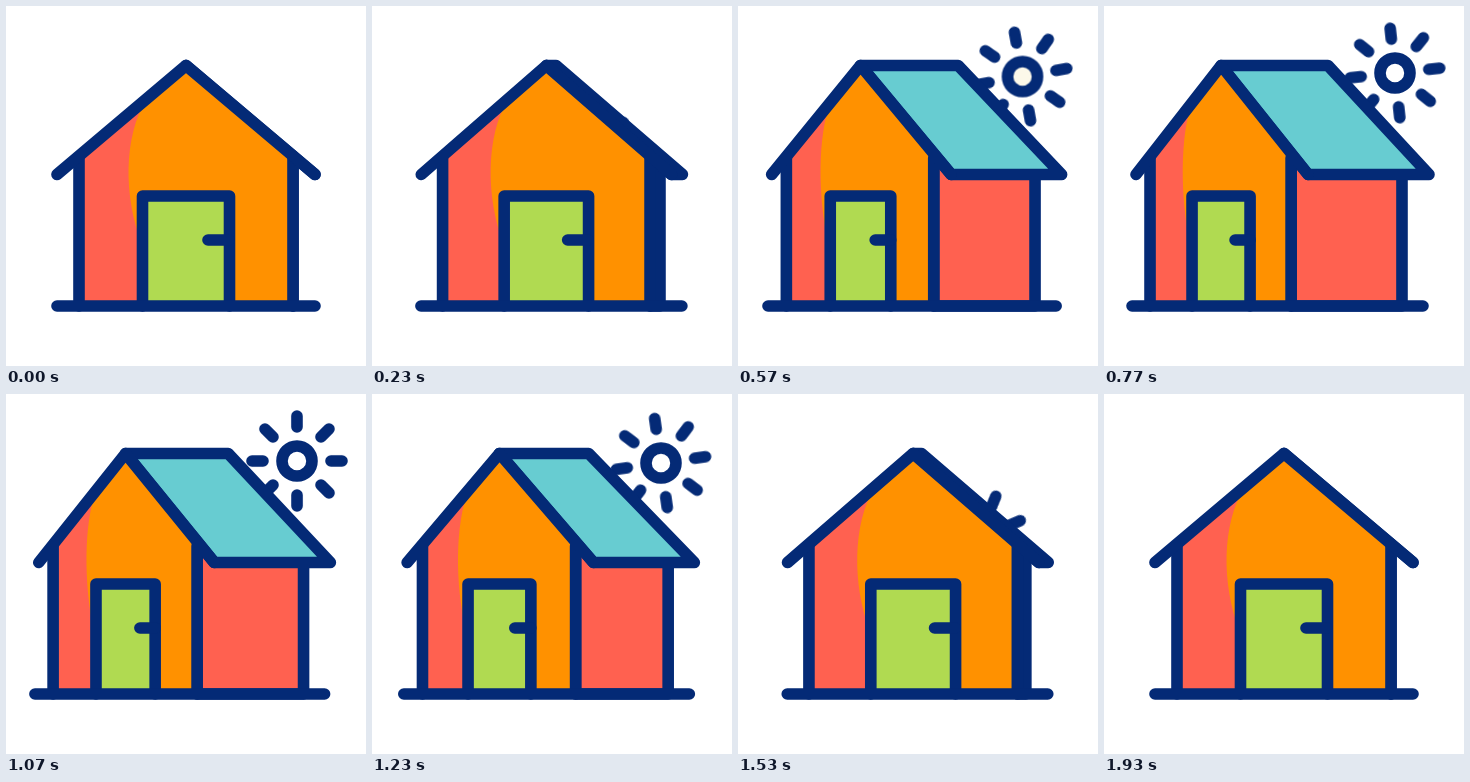
Write an HTML page that moves like this. It is 360 px wide and 360 px high and loops after 2 s.

```html
<!DOCTYPE html>
<html lang="en">
<head>
<meta charset="utf-8">
<title>House turning to the sun</title>
<style>
  html, body { margin: 0; width: 100%; height: 100%; overflow: hidden; background: #fff; }
  svg { display: block; width: 100vw; height: 100vh; }

  :root {
    --navy: #042a76;
    --orange: #ff9100;
    --coral: #ff6150;
    --green: #b0da51;
    --teal: #67ccd1;
    --yellow: #e9cb62;
  }

  path, circle {
    fill: none;
    stroke: var(--navy);
    stroke-width: 11.6;
    stroke-linecap: round;
    stroke-linejoin: round;
  }
  .flat { stroke: none; }

  /* Each house part morphs between its front view and its turned view. */
  .house path { d: var(--front); animation: turn 2s infinite; }
  @keyframes turn {
    0% { d: var(--front); animation-timing-function: cubic-bezier(.7, 0, .3, 1); }
    40% { d: var(--turned); animation-timing-function: cubic-bezier(.84, 0, .04, 1); }
    96.5%, 100% { d: var(--front); }
  }

  .side {
    fill: var(--coral);
    --front: path("M287 150V300H287V150Z");
    --turned: path("M187 150V300H298V150Z");
  }
  .roof {
    fill: var(--teal);
    --front: path("M180 59.5L180 59.5L309 168.5L309 168.5Z");
    --turned: path("M117 59.5L224 59.5L325 168.5L204 168.5Z");
  }
  .face {
    fill: var(--coral);
    --front: path("M180 59.5L73 150V300H287V150Z");
    --turned: path("M117 59.5L46 150V300H187V150Z");
  }
  .light {
    fill: var(--orange);
    --front: path("M180 59.5L140 94C118 130 117 190 136 238V300H287V150Z");
    --turned: path("M117 59.5L88 96C76 130 76 190 86 238V300H187V150Z");
  }
  .door {
    fill: var(--green);
    --front: path("M136.5 300V190H223.5V300");
    --turned: path("M88 300V190H146V300");
  }
  .handle {
    --front: path("M202 234H223");
    --turned: path("M131 234H146");
  }
  .walls {
    --front: path("M73 152V300M287 152V300");
    --turned: path("M46 152V300M187 152V300");
  }
  .gable {
    --front: path("M51 168.5L180 59.5L309 168.5");
    --turned: path("M32 168.5L117 59.5L204 168.5");
  }
  .ground {
    --front: path("M51 300H309");
    --turned: path("M28 300H319");
  }

  .sun { animation: rise 2s infinite; }
  .spin { animation: spin 2s linear infinite; }
  .glow { fill: var(--yellow); animation: glow 2s linear infinite; }

  @keyframes rise {
    0% { transform: translate(214px, 180px); animation-timing-function: cubic-bezier(.5, 0, .8, .68); }
    20% { transform: translate(262px, 110px); animation-timing-function: cubic-bezier(.3, .38, .65, .92); }
    26.5% { transform: translate(280px, 73px); animation-timing-function: cubic-bezier(.2, .6, .5, 1); }
    38.5% { transform: translate(291px, 67px); }
    53.5% { transform: translate(291px, 67px); animation-timing-function: cubic-bezier(.6, 0, .8, .6); }
    61.5% { transform: translate(289px, 69px); animation-timing-function: cubic-bezier(.5, .05, .6, .9); }
    76.5% { transform: translate(241px, 144px); animation-timing-function: cubic-bezier(.2, .5, .5, 1); }
    96.5%, 100% { transform: translate(214px, 180px); }
  }
  @keyframes spin {
    0%, 100% { transform: rotate(-22deg); }
    53.5% { transform: rotate(0deg); }
    76.5% { transform: rotate(-23deg); }
  }
  @keyframes glow {
    0%, 20% { opacity: 1; }
    30%, 65% { opacity: 0; }
    76%, 100% { opacity: 1; }
  }
</style>
</head>
<body>
<svg viewBox="0 0 360 360">
  <g class="sun">
    <circle class="flat glow" r="15"/>
    <circle r="15"/>
    <path class="spin" d="M0-34V-45M0 34V45M-34 0H-45M34 0H45M24-24L32-32M24 24L32 32M-24 24L-32 32M-24-24L-32-32"/>
  </g>
  <g class="house">
    <path class="side"/>
    <path class="roof"/>
    <path class="face flat"/>
    <path class="light flat"/>
    <path class="door"/>
    <path class="handle"/>
    <path class="walls"/>
    <path class="gable"/>
    <path class="ground"/>
  </g>
</svg>
</body>
</html>
```
